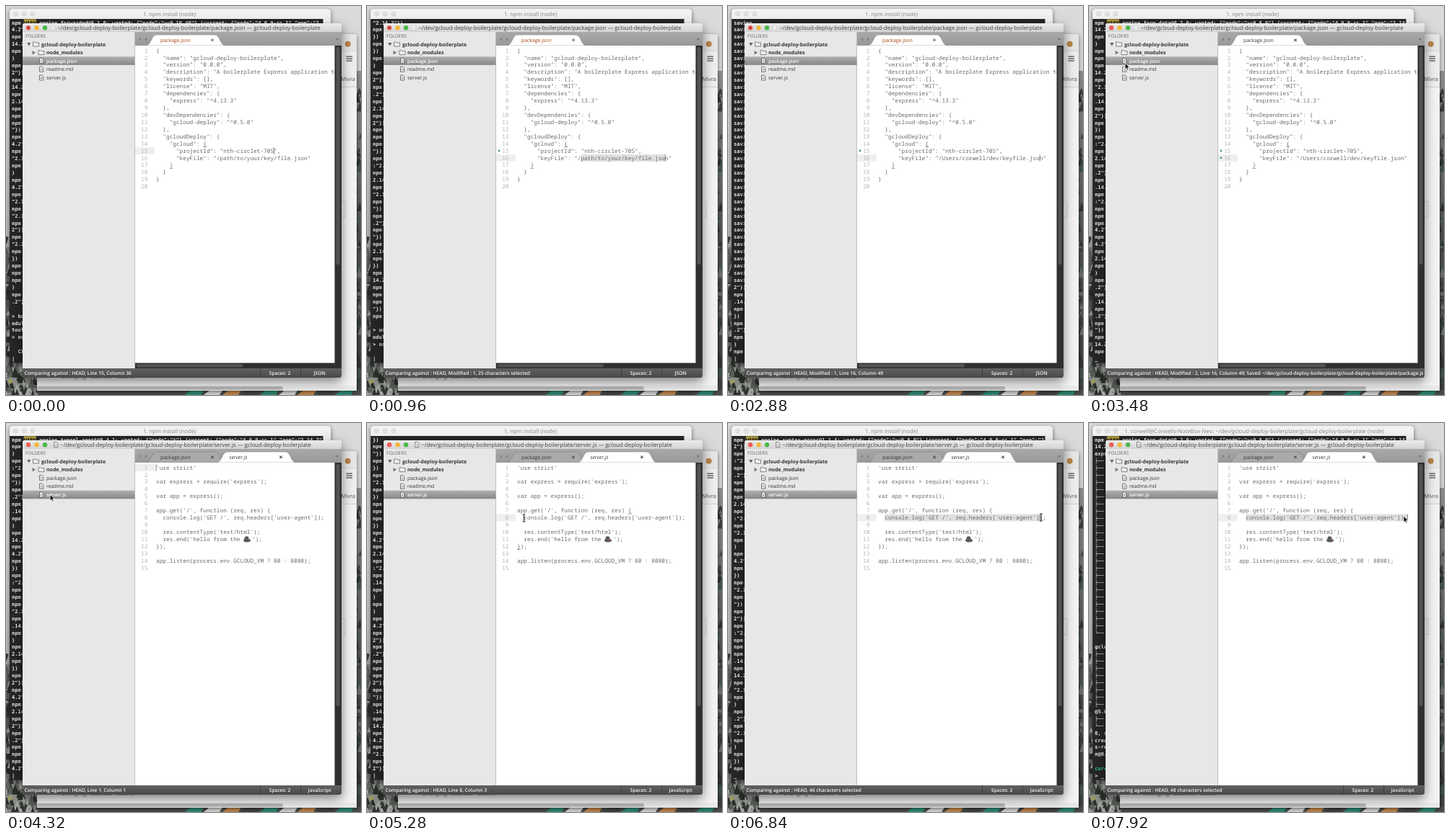
An HTML page with a canvas for the animation above (8000 ms loop, 492 by 540 pixels).

```html
<!DOCTYPE html>
<html lang="en">
<head>
<meta charset="utf-8">
<title>Editor and terminal</title>
<style>
html, body { margin: 0; width: 492px; height: 540px; overflow: hidden; background: #d9d9d9; }
canvas { display: block; width: 492px; height: 540px; }
</style>
</head>
<body>
<canvas id="stage"></canvas>
<script>
const W = 492, H = 540, LOOP = 8000, TICK = 120;
const canvas = document.getElementById('stage');
const dpr = window.devicePixelRatio || 1;
canvas.width = W * dpr;
canvas.height = H * dpr;
const c = canvas.getContext('2d');
c.scale(dpr, dpr);
c.textRendering = 'geometricPrecision';

const UI = '"Open Sans", sans-serif';
const CODE = '7.78px "Noto Sans Mono", monospace';
const TERM = 'bold 7px "DejaVu Sans Mono", monospace';
const CH = 4.668, ROW = 9.93, CODE_X = 208, CODE_Y = 62;
const INK = '#6a6a6a';
const REPO = 'gcloud-deploy-boilerplate';
const USER = 'corwell';

// ---------- helpers ----------
const clamp = (v, a, b) => Math.max(a, Math.min(b, v));
const mix = (a, b, p) => a + (b - a) * p;
const hash = n => { const s = Math.sin(n * 127.1 + 3.7) * 43758.5453; return s - Math.floor(s); };

function rect(x, y, w, h, fill) {
  c.fillStyle = fill;
  c.fillRect(x, y, w, h);
}
function round(x, y, w, h, r, fill) {
  c.fillStyle = fill;
  c.beginPath();
  c.roundRect(x, y, w, h, r);
  c.fill();
}
function dot(x, y, r, fill) {
  c.fillStyle = fill;
  c.beginPath();
  c.arc(x, y, r, 0, 7);
  c.fill();
}
function poly(points, fill, stroke) {
  c.beginPath();
  points.forEach(([x, y]) => c.lineTo(x, y));
  c.closePath();
  if (fill) { c.fillStyle = fill; c.fill(); }
  if (stroke) { c.strokeStyle = stroke; c.lineWidth = 0.8; c.stroke(); }
}
function text(s, x, y, font, fill, align = 'left') {
  c.font = font;
  c.fillStyle = fill;
  c.textAlign = align;
  c.fillText(s, x, y + 2.6);
}
function fade(y0, y1, ...colors) {
  const g = c.createLinearGradient(0, y0, 0, y1);
  colors.forEach((col, i) => g.addColorStop(i / (colors.length - 1), col));
  return g;
}
function clipped(x, y, w, h, draw) {
  c.save();
  c.beginPath();
  c.rect(x, y, w, h);
  c.clip();
  draw();
  c.restore();
}
function shadowed(blur, dy, draw) {
  c.save();
  c.shadowColor = 'rgba(0,0,0,.5)';
  c.shadowBlur = blur * dpr;
  c.shadowOffsetY = dy * dpr;
  draw();
  c.restore();
}

// ---------- terminal log ----------
const PACKAGES = ['forwarded@0.1.0', 'tunnel-agent@0.4.1', 'form-data@0.2.0', 'boom@2.10.1', 'syntax-error@1.1.4', 'hawk@3.1.0'];
const RANGES = ['>= 0.6', '*', '>=0.10.40', '>=0.8.0'];
const pick = (list, n) => list[Math.floor(hash(n) * list.length)];

function warning(k) {
  if (k % 2 && k % 11 !== 2) return '"npm":"2.14.2"})'.slice(-1 - Math.floor(hash(k) * 11));
  return `npm WARN engine ${pick(PACKAGES, k)}: wanted: {"node":"${pick(RANGES, k + 9)}"} (current: {"node":"4.0.0-rc.1","npm":"2.14.2"})`.slice(0, 102);
}

const log = [], ends = [];
let warned = 0;
const say = (...lines) => log.push(...lines);
const warn = n => { while (n--) say(warning(warned++)); };
const repeat = (s, n) => Array(n).fill(s);

for (let i = 0; i <= 66; i++) {
  if (i === 0) {
    warn(40);
    say('', '> bufferutil', 'odules', 'tools', '> node-gyp rebuild', '', '  CXX(target)');
  } else if (i < 8) warn(i === 7 ? 7 : 6);
  else if (i === 8) say('', '> unicode', 'odules', '> node install.js', '');
  else if (i === 9) say('try', '/usr/share', 'try', '/usr/local', 'try', 'Unicode data', 'GET', 'fetching');
  else if (i < 24) say(...repeat('saving', 3));
  else if (i < 30) warn(10);
  else if (i < 62) warn(7);
  else if (i === 62) {
    say(warning(44), '14.2"})', 'express@4.13.3', ...repeat('├── ', 24), '└── ', '', 'gcloud-deploy@0.5.0',
      ...repeat('├── ', 8), '@5.0.1', '├── ', '└── ', '0, send', 'create', 's-request', 'n@0.4', '', USER);
  }
  ends.push(log.length);
}
const installed = i => i >= 62;

function drawTerminal(i) {
  const done = installed(i);
  shadowed(6, 2, () => round(5, 4, 445, 491.5, 3, '#262626'));
  round(5, 4, 445, 14, [3, 3, 0, 0], '#f1f1f1');
  rect(439.5, 18, 10.5, 477, '#f7f7f7');
  for (let k = 0; k < 3; k++) {
    dot(13.5 + k * 11.7, 11, 3.3, '#cfcfcf');
    dot(13.5 + k * 11.7, 11, 2.8, '#e0e0e0');
  }
  const title = done ? `1. ${USER}@Corwells-NoteBox-Neo: ~/dev/${REPO}/${REPO} (node)` : '1. npm install (node)';
  text(title, done ? 229 : 226.5, 11, '7.7px ' + UI, '#858585', 'center');

  clipped(5, 18, 434, 477, () => {
    const rows = log.slice(ends[i] - 47, ends[i]);
    rows.push(done ? '> _' : '|_/\\'[i % 4]);
    rows.forEach((line, r) => {
      const y = 22.9 + r * ROW;
      text(line, 8, y, TERM, done && r === 46 ? '#35c48d' : '#f2f2f2');
      if (line.startsWith('npm WARN')) {
        rect(24.8, y - 4.5, 17, 9, '#b9a23c');
        text('WARN', 24.9, y, TERM, '#222');
      }
    });
  });
}

// ---------- desktop and browser ----------
function drawTrees(x, y, w, h, count, colors) {
  clipped(x, y, w, h, () => {
    for (let k = 0; k < count; k++) {
      const tx = x + hash(k) * w, ty = y + hash(k + 50) * h, r = 2 + hash(k + 90) * 3;
      poly([[tx - r, ty + r * 2], [tx, ty - r], [tx + r, ty + r * 2]], colors[k % colors.length]);
    }
  });
}

function drawDesktop() {
  const greys = ['#333733', '#5a5f59', '#a5a8a3', '#2a2d2a'];
  rect(0, 0, W, H, fade(0, 320, '#dadbda', '#d2d3d2', '#b8bab8'));
  rect(0, 320, 6, 175, fade(320, 495, '#8f918f', '#4d504d', '#6f726f'));
  drawTrees(0, 320, 6, 175, 40, greys);
  rect(480, 90, 12, 450, fade(90, 540, '#8f9290', '#4f5351', '#3c403e'));
  drawTrees(480, 110, 12, 430, 90, ['#3b3f3d', '#6c716e', '#2f3331', '#41554f']);
  rect(0, 495, 46, 45, '#8a8d88');
  drawTrees(0, 492, 46, 48, 60, greys);
  dot(6, 521, 3, '#9a9a5a');
  rect(44, 533, 448, 7, '#4a4d4b');
  const flags = ['#2f8f78', '#dedfda', '#c98b4e', '#3f4442'];
  for (let k = 0; k < 9; k++) {
    const x = 248 + k * 26;
    poly([[x, 540], [x + 10, 532], [x + 27, 532], [x + 22, 540]], flags[k % 4]);
  }
}

function drawBrowser() {
  shadowed(6, 2, () => round(43, 39, 443, 495, 3, '#e6e6e6'));
  rect(43, 62, 443, 50, '#eeeeee');
  rect(43, 62, 443, 0.7, '#cfcfcf');
  rect(43, 112, 443, 0.8, '#cdcdcd');
  rect(43, 113, 443, 414, '#f3f3f3');
  dot(473.7, 52.7, 4, '#b98549');
  for (let k = 0; k < 3; k++) rect(471.5, 69.4 + k * 3, 8.5, 1.5, '#666');
  text('Mivra', 464.5, 101.5, '7.5px ' + UI, '#555');
  c.strokeStyle = '#d6d6d6';
  c.lineWidth = 1;
  c.strokeRect(455.5, 271.5, 14.5, 22);
  text('Changing   address   details', 76, 514, '8px ' + UI, '#777');
  rect(43, 527, 443, 7, '#e9e9e9');
  round(43, 528, 341, 5, 2.5, '#b4b4b4');
}

// ---------- editor state ----------
const TYPED = `Users/${USER}/dev/keyfile.jso`;
const PATH = 'path/to/your/key/file.jso';
const DRAG_X = CODE_X + 2 * CH;

function mouseAt(t) {
  const stops = [[3120, 276, 197], [3480, 50, 79], [3960, 61, 99], [4320, 61, 99], [4920, 217.5, 132],
    [5640, 217.5, 132], [6840, 434, 131], [7200, 441.5, 131], [7440, 436, 129], [8000, 436, 129]];
  if (t < stops[0][0]) return null;
  const n = stops.findIndex(s => s[0] > t);
  const [t0, x0, y0] = stops[n - 1], [t1, x1, y1] = stops[n];
  const p = (t - t0) / (t1 - t0), e = p * p * (3 - 2 * p);
  return { x: mix(x0, x1, e), y: mix(y0, y1, e) };
}

function stateAt(t) {
  const s = { server: t >= 4080, mouse: mouseAt(t), saved: t >= 3000, dots: [], sel: 0, selCol: 0, brackets: [] };
  if (s.server) {
    s.line = t < 5040 ? 1 : 8;
    s.selCol = 2;
    if (t >= 5640) s.sel = t >= 7200 ? 48 : clamp(Math.round((s.mouse.x - DRAG_X) / CH), 0, 48);
    s.col = s.line === 1 ? 0 : 2 + s.sel;
    if (s.line === 8 && !s.sel) s.brackets = [[7, 33], [12, 0]];
  } else {
    const n = clamp(Math.floor((t - 1200) / 54 + 1e-6), 0, TYPED.length);
    s.value = t < 1200 ? PATH : TYPED.slice(0, n);
    s.line = t < 360 ? 15 : 16;
    s.selCol = 19;
    if (t < 1200) s.sel = clamp(Math.floor((t - 360) / 24), 0, 25);
    s.col = s.line === 15 ? 35 : 19 + (t < 1200 ? s.sel : n);
    if (t >= 240) s.dots.push(15);
    if (s.saved) s.dots.push(16);
    s.brackets = [[14, 14], [17, 4]];
  }
  const changed = s.dots.length ? `Modified : ${s.dots.length}, ` : '';
  const place = s.sel ? `${s.sel} characters selected` : `Line ${s.line}, Column ${s.col + 1}`;
  s.status = `Comparing against : HEAD, ${changed}${place}`;
  s.saving = s.saved && !s.server;
  s.caret = !s.saving;
  if (s.saving) s.status += `; Saved ~/dev/${REPO}/${REPO}/package.json (UTF-8)`;
  return s;
}

const packageLines = value => [
  '{',
  `  "name": "${REPO}",`,
  '  "version": "0.0.0",',
  '  "description": "A boilerplate Express application to deploy",',
  '  "keywords": [],',
  '  "license": "MIT",',
  '  "dependencies": {',
  '    "express": "^4.13.3"',
  '  },',
  '  "devDependencies": {',
  '    "gcloud-deploy": "^0.5.0"',
  '  },',
  '  "gcloudDeploy": {',
  '    "gcloud": {',
  '      "projectId": "nth-circlet-705",',
  `      "keyFile": "/${value}n"`,
  '    }', '  }', '}', ''];

const SERVER = [
  "'use strict'", '',
  "var express = require('express');", '',
  'var app = express();', '',
  "app.get('/', function (req, res) {",
  "  console.log('GET /', req.headers['user-agent']);", '',
  "  res.contentType('text/html');",
  "  res.end('hello from the ",
  '});', '',
  'app.listen(process.env.GCLOUD_VM ? 80 : 8080);', ''];

// ---------- editor drawing ----------
function fileIcon(x, y, stroke) {
  poly([[x - 2.5, y - 3.5], [x + 1, y - 3.5], [x + 2.8, y - 1.5], [x + 2.8, y + 3.5], [x - 2.5, y + 3.5]], '#f4f4f4', stroke);
  rect(x - 1.2, y - 0.7, 2.6, 0.6, stroke);
  rect(x - 1.2, y + 1, 2.6, 0.6, stroke);
}
function folderIcon(x, y) {
  poly([[x - 4, y - 3], [x - 1, y - 3], [x, y - 2], [x + 4, y - 2], [x + 4, y + 3], [x - 4, y + 3]], '#f0f0f0', '#666');
}

function drawSidebar(s) {
  rect(23, 36, 155.5, 467, '#e7e7e7');
  rect(178, 36, 0.8, 467, '#b5b5b5');
  text('FOLDERS', 27, 41.8, '6.6px ' + UI, '#666');
  poly([[29, 51], [34.5, 51], [31.7, 55.5]], '#666');
  folderIcon(41.5, 53);
  text(REPO, 49, 53, 'bold 7px ' + UI, '#333');
  poly([[36.5, 62], [41, 64.8], [36.5, 67.6]], '#777');
  folderIcon(49, 64.7);
  text('node_modules', 56, 64.7, 'bold 7px ' + UI, '#333');
  const picked = s.server ? 2 : 0;
  ['package.json', 'readme.md', 'server.js'].forEach((name, k) => {
    const y = 76.1 + k * 11.7, on = k === picked;
    if (on) rect(23, y - 5.8, 155.5, 11.6, fade(y - 6, y + 6, '#b0b0b0', '#868686'));
    fileIcon(49, y, '#555');
    text(name, 56, y, (on ? '600 6.7px ' : '6.9px ') + UI, on ? '#fff' : '#333');
  });
}

function drawTab(x, active) {
  c.beginPath();
  c.moveTo(x - 6, 55);
  c.bezierCurveTo(x + 2, 54, x + 1, 40, x + 9, 40);
  c.lineTo(x + 89, 40);
  c.bezierCurveTo(x + 97, 40, x + 96, 54, x + 104, 55);
  c.closePath();
  c.fillStyle = active ? '#fff' : '#aaa';
  c.fill();
  c.strokeStyle = active ? '#8a8a8a' : '#7f7f7f';
  c.lineWidth = 0.6;
  c.stroke();
}
function cross(x, y, color) {
  c.strokeStyle = color;
  c.lineWidth = 1.1;
  c.beginPath();
  c.moveTo(x - 1.7, y - 1.7); c.lineTo(x + 1.7, y + 1.7);
  c.moveTo(x + 1.7, y - 1.7); c.lineTo(x - 1.7, y + 1.7);
  c.stroke();
}

function drawTabs(s) {
  rect(179, 36, 286, 19, fade(36, 55, '#a9a9a9', '#989898'));
  poly([[187, 44], [187, 48.5], [184, 46.3]], '#808080');
  poly([[193, 44], [193, 48.5], [196, 46.3]], '#808080');
  poly([[456.5, 45], [461.5, 45], [459, 48]], '#777');
  drawTab(200, !s.server);
  text('package.json', 214, 47.3, '6.9px ' + UI, s.saved ? '#333' : '#a8400c');
  if (s.saved) cross(286, 47.3, '#555');
  else dot(286, 47.3, 2, '#999');
  if (s.server) {
    drawTab(298, true);
    text('server.js', 309.5, 47.3, 'italic 6.9px ' + UI, '#333');
    cross(381, 47.3, '#555');
  }
}

function drawEmoji(x, y) {
  c.fillStyle = '#555a5c';
  c.beginPath();
  c.ellipse(x, y + 1.8, 5, 2.4, 0, 0, 7);
  c.ellipse(x - 0.5, y - 1.2, 3, 2.8, 0, 0, 7);
  c.fill();
  dot(x + 1.7, y + 0.5, 1.1, '#b9504a');
}

function drawScrollbars(s) {
  rect(455.5, 55, 9.5, 448, '#303030');
  round(457.6, 57, 5, s.server ? 336 : 302, 2.5, '#535353');
  if (s.server) return;
  rect(179, 495.5, 286, 7.5, '#303030');
  round(181, 497, 147, 4.5, 2.2, '#535353');
}

function drawCode(s) {
  rect(179, 55, 277, 448, '#fff');
  const rowY = CODE_Y + (s.line - 1) * ROW;
  rect(179, rowY - 5, 27, ROW, '#efefef');
  if (s.sel) rect(CODE_X + s.selCol * CH, rowY - 5, s.sel * CH, ROW, '#e0e0e0');
  const lines = s.server ? SERVER : packageLines(s.value);
  clipped(179, 55, 277, 448, () => {
    lines.forEach((line, k) => {
      const y = CODE_Y + k * ROW;
      text(k + 1, 196.5, y, CODE, '#b4b4b4', 'right');
      text(line, CODE_X, y, CODE, INK);
    });
    if (s.server) {
      const y = CODE_Y + 10 * ROW;
      drawEmoji(334, y);
      text("');", 341, y, CODE, INK);
    }
    s.dots.forEach(n => dot(183, CODE_Y + (n - 1) * ROW, 1.4, '#3f9a5c'));
    s.brackets.forEach(([n, col]) => rect(CODE_X + col * CH, CODE_Y + (n - 1) * ROW + 4, CH, 0.8, '#777'));
    if (s.caret) rect(CODE_X + s.col * CH - 0.3, rowY - 4.8, 0.8, 9.6, '#666');
  });
  drawScrollbars(s);
}

function drawStatus(s) {
  round(23, 503, 442, 13, [0, 0, 3, 3], fade(503, 516, '#626262', '#484848'));
  const font = '600 6.7px ' + UI;
  clipped(23, 503, 440.5, 13, () => text(s.status, 25.5, 509.7, font, '#f4f4f4'));
  if (s.saving) return;
  rect(352, 503, 0.8, 13, '#3a3a3a');
  rect(408, 503, 0.8, 13, '#3a3a3a');
  text('Spaces: 2', 379.5, 509.7, font, '#f4f4f4', 'center');
  text(s.server ? 'JavaScript' : 'JSON', 434.7, 509.7, font, '#f4f4f4', 'center');
}

function drawMouse(s) {
  if (!s.mouse) return;
  const { x, y } = s.mouse;
  if (x < 179 || (s.sel === 48 && x < 437)) {
    poly([[x, y], [x, y + 9], [x + 2.1, y + 7.1], [x + 3.5, y + 10.2], [x + 5, y + 9.5], [x + 3.7, y + 6.5], [x + 6.4, y + 6.4]], '#111', '#fff');
  } else {
    rect(x - 0.5, y - 5, 1, 10, '#222');
    rect(x - 2, y - 5.4, 4, 0.9, '#222');
    rect(x - 2, y + 4.5, 4, 0.9, '#222');
  }
}

function drawEditor(s) {
  shadowed(16, 5, () => round(23, 24, 442, 492, 3, '#e4e4e4'));
  round(23, 24, 442, 12, [3, 3, 0, 0], fade(24, 36, '#ebebeb', '#d3d3d3'));
  ['#ee5f56', '#f2b73a', '#4db848'].forEach((col, k) => dot(31 + k * 11.5, 30.2, 3.2, col));
  if (!s.saved) dot(31, 30.2, 1.2, '#7a231e');
  const file = s.server ? 'server.js' : 'package.json';
  fileIcon(s.server ? 69 : 64.5, 30, s.server ? '#666' : '#ccc');
  text(`~/dev/${REPO}/${REPO}/${file} — ${REPO}`, s.server ? 249 : 253.5, 30, '7.76px ' + UI, '#3d3d3d', 'center');
  drawSidebar(s);
  drawTabs(s);
  drawCode(s);
  drawStatus(s);
  drawMouse(s);
}

// ---------- loop ----------
function draw(i) {
  drawDesktop();
  drawBrowser();
  drawTerminal(i);
  drawEditor(stateAt(i * TICK));
}

const start = performance.now();
function frame() {
  const t = Math.max(0, performance.now() - start) % LOOP;
  draw(Math.floor(t / TICK));
  requestAnimationFrame(frame);
}
draw(0);
requestAnimationFrame(frame);
</script>
</body>
</html>
```
